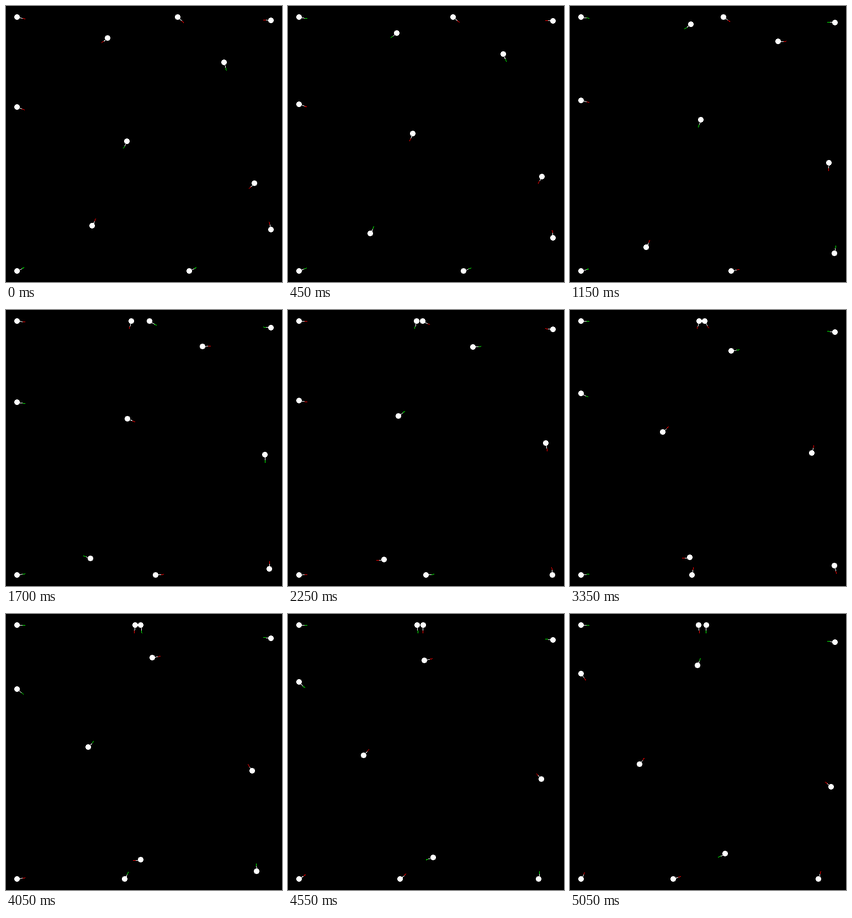
Write an HTML page with a canvas that moves like this. It is 500 px wide and 500 px high and loops after 5.1 s.

```html
<!DOCTYPE html>
<html lang="en">
<head>
<meta charset="utf-8">
<title>Swimming cells</title>
<style>
  html, body { margin: 0; width: 100%; height: 100%; overflow: hidden; background: #000; }
  canvas { display: block; }
</style>
</head>
<body>
<canvas id="stage" width="500" height="500"></canvas>
<script>
const STEP_MS = 50, LAST_STEP = 100, LOOP_MS = 5100;
const WALL_MIN = 20, WALL_MAX = 480;
const RADIUS = 5, TAIL = 15, TAIL_WHITE = 10, SPEED = 1.95;

const ctx = document.getElementById('stage').getContext('2d');
const clamp = (v, lo, hi) => Math.min(hi, Math.max(lo, v));
const cells = [];

// turns: [step, tail angle in degrees]; two turns on one step make a sudden tumble.
const addCell = (x, y, ...turns) => cells.push({ x, y, turns, path: [] });

addCell(20, 20, [0, 12], [50, 0]);
addCell(480, 26, [0, 184.5], [100, 190]);
addCell(395, 102, [0, 75], [21, 60], [21, -2], [97, -16], [97, -70]);
addCell(20, 183, [0, 20], [40, 6], [100, 55]);
addCell(219, 245, [0, 118], [23, 111], [23, 24], [43, 17], [43, -39], [100, -55]);
addCell(450, 321, [0, 138], [22, 95], [46, 80], [46, 0], [66, -76], [74, -120], [100, -140]);
addCell(156, 398, [0, -65], [23, -65], [23, -133], [44, -186], [80, -186], [100, -206]);
addCell(480, 405, [0, -105], [22, -82], [57, -106], [57, 104], [67, 74], [67, -13],
  [80, -13], [80, -94], [100, -75]);
addCell(20, 480, [0, -29], [44, -5], [80, -11], [100, -63]);
addCell(332, 480, [0, -30], [42, 0], [66, -82], [74, -77], [100, -22]);
addCell(184, 58, [0, 144], [23, 146], [23, 108], [76, 108], [86, 87]);
addCell(311, 20, [0, 43], [44, 27], [88, 96]);

function tailAngle({ turns }, step) {
  let i = turns.length - 1;
  while (i > 0 && turns[i][0] > step) i--;
  const [start, from] = turns[i];
  const [end, to] = turns[i + 1] || [start + 1, from];
  return (from + (to - from) * (step - start) / (end - start)) * Math.PI / 180;
}

// A cell swims away from its tail, slides along walls and is blocked by other cells.
function move(cell, step) {
  const tail = tailAngle(cell, step + 0.5);
  const x = clamp(cell.x - SPEED * Math.cos(tail), WALL_MIN, WALL_MAX);
  const y = clamp(cell.y - SPEED * Math.sin(tail), WALL_MIN, WALL_MAX);
  const blocked = cells.some(other =>
    other !== cell && Math.hypot(other.x - x, other.y - y) < 2 * RADIUS);
  if (!blocked) Object.assign(cell, { x, y });
}

for (let step = 0; step <= LAST_STEP; step++) {
  for (const cell of cells) {
    cell.path.push({ x: Math.round(cell.x), y: Math.round(cell.y), tail: tailAngle(cell, step) });
  }
  for (const cell of cells) move(cell, step);
}

// Repeatable noise in 0..1
const noise = (a, b) => Math.abs(Math.sin(a * 12.9898 + b * 78.233) * 43758.5453) % 1;

function drawTail({ x, y, tail }, colour) {
  for (let r = 0; r < TAIL; r++) {
    ctx.fillStyle = r < TAIL_WHITE ? '#fff' : colour;
    ctx.fillRect(Math.round(x + r * Math.cos(tail)), Math.round(y + r * Math.sin(tail)), 1, 1);
  }
}

// Hard-edged disc, one pixel row at a time
function drawBody({ x, y }) {
  ctx.fillStyle = '#fff';
  for (let row = -RADIUS; row < RADIUS; row++) {
    const half = Math.round(Math.sqrt(RADIUS ** 2 - (row + 0.5) ** 2));
    ctx.fillRect(x - half, y + row, 2 * half, 1);
  }
}

function draw() {
  const time = performance.now() % LOOP_MS;
  const step = clamp(Math.floor(time / STEP_MS) - 1, 0, LAST_STEP);
  ctx.fillStyle = '#000';
  ctx.fillRect(0, 0, 500, 500);
  cells.forEach(({ path }, index) => {
    drawTail(path[step], noise(step, index) < 0.5 ? '#f00' : '#0f0');
    drawBody(path[step]);
  });
  requestAnimationFrame(draw);
}
draw();
</script>
</body>
</html>
```
